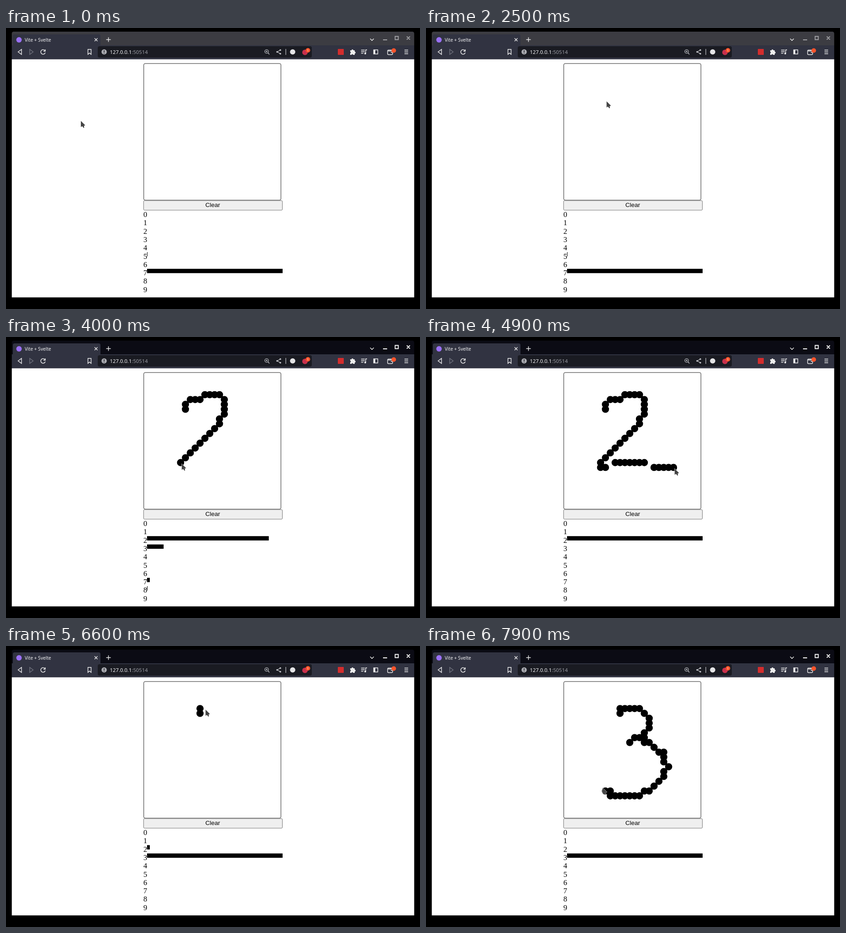
An HTML page for the animation above (8000 ms loop, 907 px wide and 617 px high).

```html
<!DOCTYPE html>
<html lang="en">
<head>
<meta charset="utf-8">
<title>Digit recogniser</title>
<style>
  html, body { margin: 0; height: 100%; overflow: hidden; background: #000; }
  svg { display: block; width: 907px; height: 617px; }
  .ui { font-family: "Noto Sans", sans-serif; font-weight: 500; }
  .line { fill: none; stroke: #eee; stroke-width: 1.4; }
  #controls { fill: none; stroke-width: 1.8; }
</style>
</head>
<body>
<svg viewBox="0 0 907 617">
  <path id="titlebar" d="M12.700 38V12Q13 8 17 8H890Q894 8 894.300 12V38Z"/>
  <path d="M12.700 38H15V18Q15 14 19 14H203Q207 14 207 18V38H894.300V69H12.700Z" fill="#313341"/>
  <path d="M12.700 68.700H894.300V591.500H12.700Z" fill="#fff"/>

  <!-- tab strip -->
  <circle cx="28.5" cy="26" r="6" fill="#9a70f5"/>
  <text class="ui" x="41" y="29.500" font-size="10.2" fill="#f2f2f4">Vite + Svelte</text>
  <path class="line" d="M194 22.500l6.500 6.500m0-6.500l-6.500 6.500M219.500 25.500h10m-5-5v10M797.800 23.500l4 4 4-4"/>
  <path id="controls" d="M826 26h9M852.500 18.500h7v7h-7zM878 18.500l7 7m0-7l-7 7"/>

  <!-- toolbar -->
  <rect x="201" y="40" width="469" height="25" rx="4" fill="#1a1b22"/>
  <path class="line" d="M34 47v11l-7.500-5.500z"/>
  <path class="line" d="M52 47v11l7.500-5.500z" style="stroke:#70727d"/>
  <path class="line" d="M85.500 50a5 5 0 1 0 .5 4M86 47v4h-4M179.500 47h7v11l-3.500-3-3.500 3z"/>
  <circle cx="215" cy="52.500" r="5.800" fill="#a9aab0"/>
  <path d="M215 49v4m0 1.500v1.500" stroke="#1a1b22" stroke-width="1.5"/>
  <text class="ui" x="227.500" y="56.500" font-size="11.3" fill="#f2f2f4">127.0.0.1<tspan fill="#9a9ba3">:50514</tspan></text>
  <g class="line" style="stroke:#c8c9ce;stroke-width:1.200">
    <circle cx="571" cy="51.500" r="4"/>
    <path d="M574 54.500l3 3.500M569 51.500h4m-2-2v4M601 48.500l-7 4 7 4M613 46v13"/>
    <g fill="#c8c9ce"><circle cx="601" cy="48.500" r="1.200"/><circle cx="594" cy="52.500" r="1.200"/><circle cx="601" cy="56.500" r="1.200"/></g>
  </g>
  <circle cx="628" cy="52.500" r="5.800" fill="#e4e4e6"/>
  <circle cx="655" cy="53.500" r="6" fill="#c8304c"/>
  <circle cx="661.500" cy="49" r="5" fill="#fb542b"/>
  <text class="ui" x="661.500" y="51.500" font-size="7" text-anchor="middle" fill="#fff">1</text>
  <rect x="727" y="46" width="13" height="13" rx="1" fill="#d32d2d"/>
  <path d="M754 49h3a2 2 0 1 1 4 0h3v3a2 2 0 1 1 0 4v3h-3.500a1.800 1.800 0 0 0-3.500 0h-3v-3.500a1.800 1.800 0 0 0 0-3.500z" fill="#eee"/>
  <path class="line" d="M778 48.500h8m-8 3.500h8m-8 3.500h5M788 56v-8h3"/>
  <circle cx="787" cy="56" r="2" fill="#eee"/>
  <path class="line" d="M805.500 48h9v9h-9z"/>
  <path d="M805 48h4v9h-4z" fill="#eee"/>
  <path class="line" d="M846 48.500h-8q-2 0-2 2v6q0 2 2 2h7q2 0 2-2v-4q0-2-2-2h-8M843 53.500h4"/>
  <circle cx="849.500" cy="49.500" r="5" fill="#fb542b"/>
  <path class="line" d="M873 48.500h8m-8 4h8m-8 4h8"/>

  <!-- page -->
  <rect x="301.800" y="78" width="300.500" height="300" rx="3" fill="none" stroke="#222"/>
  <rect x="301.500" y="379" width="304" height="21" rx="2" fill="#efefef" stroke="#767676"/>
  <text x="453" y="393" font-size="13.5" text-anchor="middle" font-family="Liberation Sans, Arial, sans-serif">Clear</text>
  <g id="digits" font-size="16.5" font-family="Liberation Serif, serif"></g>
  <path id="bars"/>
  <path id="ink" stroke="#000" stroke-width="15.8" stroke-linecap="round"/>
  <path id="pointer" d="M0 0V13.500L3 11.500L6 15.500L7.500 14L6.500 11L9.500 9.500Z" fill="#444" stroke="#fff" stroke-opacity=".85" paint-order="stroke"/>
</svg>
<script>
const $ = id => document.getElementById(id);
const LOOP = 8000, STEP = 100;
const ROW = 18.3, BAR = 297, CELL = 10.65;

const ramp = (t, from, to) => Math.min(1, Math.max(0, (t - from) / (to - from)));
const easeOut = k => k * (2 - k);
const mix = (a, b, k) => a.map((v, i) => v + (b[i] - v) * k);
const toStage = ([c, r]) => [302.6 + (c + .5) * CELL, 78.7 + (r + .5) * CELL];

// Snap each line between two corners to grid cells.
const rasterise = lines => lines.flatMap(corners => corners.slice(1).reduce((cells, end, i) => {
  const start = corners[i];
  const steps = Math.max(...end.map((v, axis) => Math.abs(v - start[axis])));
  for (let s = 1; s <= steps; s++)
    cells.push(mix(start, end, s / steps).map(v => Math.ceil(v - .5)));
  return cells;
}, [corners[0]]));

const two = {
  cells: rasterise([
    [[8, 7], [9, 5], [15, 4], [16, 5], [16, 8], [15, 10], [7, 18], [7, 19], [8, 19]],
    [[10, 18], [16, 18]],
    [[18, 19], [22, 19]]
  ]),
  from: 2600, to: 4890, cleared: 5700,
  chanceOfTwo: t => Math.max(.02, ramp(t, 3500, 4068))
};
const three = {
  cells: rasterise([
    [[11, 6], [11, 5], [15, 5], [17, 7], [17, 9], [16, 11], [14, 11], [13, 12]],
    [[16, 12], [17, 12], [19, 14], [20, 14], [20, 16], [21, 17], [20, 19], [17, 22], [15, 23], [9, 23], [9, 22], [8, 22]]
  ]),
  from: 6535, to: 7800, cleared: LOOP,
  chanceOfTwo: t => .02 * (1 - ramp(t, 6600, 7000))
};
const strokes = [two, three];

const progress = (stroke, t) => ramp(t, stroke.from, stroke.to) * (stroke.cells.length - 1);

function penAt({ cells }, p) {
  const i = Math.floor(p);
  const [x, y] = toStage(mix(cells[i], cells[i + 1] || cells[i], p - i));
  return [x + 2.500, y + 2.500];
}

const glide = (from, to, target) => ({ from, to, target });
const actions = [
  glide(500, 1400, penAt(two, 0)), two,
  glide(5000, 5600, [470, 391]),
  glide(5800, 6400, penAt(three, 0)), three,
  glide(7800, 7900, [387, 311])
];

function pointerAt(t) {
  let pos = [164, 204];
  for (const action of actions) {
    if (t < action.from) break;
    pos = action.cells
      ? penAt(action, progress(action, t))
      : mix(pos, action.target, easeOut(ramp(t, action.from, action.to)));
  }
  return pos;
}

// Bar width for each guessed digit; other digits get a share while 2 and 3 compete.
function guesses(stroke, t) {
  if (!stroke) return { 5: 1, 7: BAR };
  const chance = stroke.chanceOfTwo(t);
  const doubt = (4 * chance * (1 - chance)) ** 2;
  return { 2: 303 * chance, 3: 303 * (1 - chance), 7: 34 * doubt, 8: 6 * doubt };
}

function draw(t) {
  const focused = t >= two.from;
  $('titlebar').setAttribute('fill', focused ? '#0b0b14' : '#3c3c42');
  $('controls').setAttribute('stroke', focused ? '#fff' : '#a3a3a7');

  const stroke = strokes.find(s => t >= s.from && t < s.cleared);
  const inked = stroke ? stroke.cells.slice(0, Math.floor(progress(stroke, t)) + 1) : [];
  $('ink').setAttribute('d', inked.map(cell => `M${toStage(cell)}h0`).join(''));
  $('pointer').setAttribute('transform', `translate(${pointerAt(t)})`);

  $('bars').setAttribute('d', Object.entries(guesses(stroke, t))
    .filter(([, width]) => width > .8)
    .map(([digit, width]) => `M309 ${400.6 + ROW * digit}h${Math.min(width, BAR)}v9.500H309z`).join(''));
}

$('digits').innerHTML = [...Array(10).keys()]
  .map(n => `<text x="301" y="${415 + ROW * n}">${n}</text>`).join('');

const begin = performance.now();
function frame() {
  const t = (performance.now() - begin) % LOOP;
  draw(Math.floor(t / STEP) * STEP);
  requestAnimationFrame(frame);
}
frame();
</script>
</body>
</html>
```
